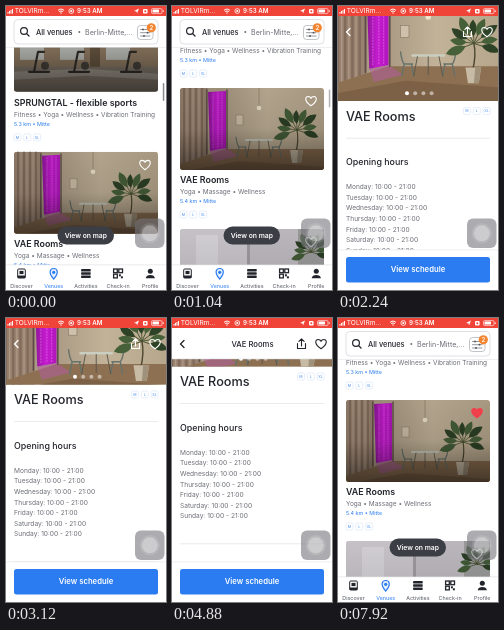
Write an HTML page that moves like this. It is 160 by 284 pixels and loops after 8000 ms.

```html
<!DOCTYPE html>
<html lang="en">
<head>
<meta charset="utf-8">
<title>Venue list and details</title>
<style>
  html, body { margin: 0; width: 100%; height: 100%; overflow: hidden; background: #fff; }
  svg { display: block; font-family: Inter, "Open Sans", sans-serif; }
  #stage { width: 100vw; height: 100vh; }
</style>
</head>
<body>
<svg id="stage" viewBox="0 0 160 284"></svg>
<script>
const LOOP = 8000;
const INK = '#22242b', GREY = '#6c6e76', BLUE = '#2b7cf0', RED = '#f0404c';
const VENUE = 'VAE Rooms';
const HEART = 'M0 4.8C-7 .2-6-4.5-2.9-4.5-1.3-4.5-.3-3.5 0-2.6.3-3.5 1.3-4.5 2.9-4.5 6-4.5 7 .2 0 4.8Z';

const rect = (x, y, w, h, fill, rx = 0, extra = '') =>
  `<rect x="${x}" y="${y}" width="${w}" height="${h}" rx="${rx}" fill="${fill}" ${extra}/>`;
const circle = (x, y, r, fill, extra = '') =>
  `<circle cx="${x}" cy="${y}" r="${r}" fill="${fill}" ${extra}/>`;
const line = (d, color = INK, width = 1, extra = '') =>
  `<path d="${d}" fill="none" stroke="${color}" stroke-width="${width}" stroke-linecap="round" stroke-linejoin="round" ${extra}/>`;
const shape = (d, fill, extra = '') => `<path d="${d}" fill="${fill}" ${extra}/>`;
const text = (x, y, size, str, fill = INK, weight = 400, anchor = 'start') =>
  `<text x="${x}" y="${y}" font-size="${size}" fill="${fill}" font-weight="${weight}" text-anchor="${anchor}">${str}</text>`;
const group = (x, y, body) => `<g transform="translate(${x} ${y})">${body}</g>`;
const heart = color =>
  `<path d="${HEART}" fill="none" stroke="${color}" stroke-width="1.1" stroke-linejoin="round"/>`;

const badges = (x, y) => ['M', 'L', 'XL'].map((s, i) =>
  rect(x + i * 9.8 - 3.5, y - 3.5, 7, 7, '#fff', 1.4, 'stroke="#dce8fa" stroke-width=".7"') +
  text(x + i * 9.8, y + 1.3, 3.6, s, '#6ba1ee', 500, 'middle')).join('');

// Pointed oval leaves fan out from the top of a stem.
function plant(x, y, size) {
  return [-172, -146, -118, -92, -66, -38, -10, 18, 160].map((angle, i) => {
    const length = size * (1 + i % 3 * .12);
    return `<g transform="translate(${x} ${y}) rotate(${angle})">` +
      line(`M0 0H${length * .4}`, '#46512f', .7) +
      shape(`M${length * .3} 0Q${length * .65} ${-length * .34} ${length} 0Q${length * .65} ${length * .26} ${length * .3} 0Z`,
        i % 2 ? '#2d4226' : '#46603a') + '</g>';
  }).join('');
}

function roomPhoto() {
  const chair = (x, flip) => `<g transform="translate(${x} 49) scale(${flip} 1)">` +
    line('M0 0Q1 8 3 10H10M3 10L1 20M9 10L11 20', '#66726a', 1.2) + '</g>';
  return rect(0, 0, 144, 95, 'url(#wall)') +
    rect(0, 0, 28, 95, '#98826f') +
    line('M4 0V82M10 0V80M16 0V78M22 0V75', '#826b5b', 2) + line('M7 0V82M13 0V80M19 0V78', '#ae9987', 1) +
    shape('M0 76L46 61H144V95H0Z', '#8d7052') + shape('M0 84L60 73L144 79V95H0Z', '#7d6147') +
    shape('M30 63L46 60L58 68L34 74Z', '#b65ca6', 'opacity=".5"') +
    shape('M28 4L46 3V60L30 63Z', 'url(#neon)') +
    line('M33 6V60M38 5V60M42 5V60', '#dc52e4', .8, 'stroke-dasharray="1 1.4"') +
    line('M26.8 2V66M47 2V61', '#5f4c49', 1.4) +
    rect(56, 27, 7, 10, '#cec0aa', 0, 'stroke="#8f806c" stroke-width=".6"') +
    line('M79 0V18', '#776c5b', .5) + circle(79, 20, 2.3, '#eee3cb') +
    chair(56, 1) + chair(102, -1) +
    rect(65, 51, 28, 2, '#c9cec0', 1) + line('M70 53L67 69M88 53L91 69M79 53V68', '#5c574b', .8) +
    line('M116 64Q119 52 117 42', '#4c4630', 1.2) + plant(117, 42, 20) +
    shape('M110 62H123L121 75H112Z', '#c8bba5') + shape('M118 62H123L121 75H117Z', '#a0917b');
}

function gymPhoto() {
  const machine = x => line(`M${x} 62L${x + 4} 42H${x + 10}M${x - 5} 62H${x + 15}`, '#312d2a', 2.2) +
    circle(x + 11, 56, 4, '#443f3a');
  return rect(0, 0, 144, 82, '#8d7961') + rect(0, 0, 144, 30, '#a39179') +
    [6, 46, 92].map(x => rect(x, 30, 24, 20, '#b9bbb5')).join('') +
    rect(76, 28, 10, 32, '#65543f') + shape('M0 57H144V82H0Z', '#80766a') +
    shape('M0 62L72 59L144 64V70L72 66L0 70Z', '#9b9388') + [20, 60, 112].map(machine).join('');
}

function studioPhoto() {
  return rect(0, 0, 144, 82, '#cac6cd') + rect(0, 0, 68, 82, '#d6d2d8') +
    rect(16, 6, 22, 42, '#e3e0e5') + rect(67, 0, 3, 82, '#aaa4aa') +
    rect(118, 0, 26, 82, '#a6a5a6') + rect(0, 60, 144, 22, '#9f9289') + plant(131, 23, 17);
}

const photo = (y, body, mark) => group(8, y,
  `<g clip-path="url(#card)">${body}${rect(0, 0, 144, 82, 'url(#shade)')}</g>` + group(131, 13, mark));

const venueText = (y, title, kinds, distance) =>
  text(8, y + 3.2, 8.9, title, INK, 600) + text(8, y + 14.2, 6.5, kinds, GREY) +
  text(8, y + 23.2, 5.4, distance, BLUE) + badges(11.5, y + 34.5);

function searchBar() {
  return rect(0, 0, 160, 41, '#fff') + rect(0, 41, 160, .6, '#e3e4e8') +
    rect(8, 13.5, 144, 24.5, '#fff', 4, 'stroke="#d7d9de" stroke-width=".8"') +
    circle(18, 25, 3.4, 'none', `stroke="${INK}" stroke-width="1.2"`) + line('M20.6 27.6L23 30', INK, 1.3) +
    text(30, 28.7, 7.4, 'All venues', INK, 500) + circle(73.3, 26, 1, GREY) +
    text(79, 28.7, 7.1, 'Berlin-Mitte,...', GREY) +
    rect(131.5, 19.5, 15.5, 14, '#fff', 3, 'stroke="#9a9ca3" stroke-width=".6"') +
    line('M134.5 23.5H144M134.5 26.7H144M134.5 30H144', '#50535b', .6) +
    circle(137, 23.5, .9, '#50535b') + circle(141.5, 26.7, .9, '#50535b') + circle(138, 30, .9, '#50535b') +
    circle(145.3, 21.8, 4.6, '#f38430') + text(145.3, 24, 6, '2', '#fff', 600, 'middle');
}

function tabBar() {
  const icons = [
    rect(-3.8, -4.5, 7.6, 9, '#fff', 1, `stroke="${INK}"`) + rect(-2, -2.6, 4, 3.2, INK) + rect(-3.8, 2, 7.6, 2.5, INK),
    shape('M0 5.5C-5.5-.5-4-5 0-5S5.5-.5 0 5.5Z', '#e6f0fe', `stroke="${BLUE}" stroke-width="1.2"`) + circle(0, -1.2, 1.6, BLUE),
    [-4.5, -1.2, 2.1].map(y => rect(-4.8, y, 9.6, 2.4, INK, .4)).join(''),
    [[-4.5, -4.5], [.7, -4.5], [-4.5, .7]].map(([x, y]) =>
      rect(x, y, 3.7, 3.7, 'none', 0, `stroke="${INK}" stroke-width="1.3"`)).join('') +
      rect(.8, .8, 2, 2, INK) + rect(2.8, 2.8, 2, 2, INK),
    circle(0, -2.2, 2.5, INK) + shape('M-4.6 4.8C-4.6 .3 4.6 .3 4.6 4.8Z', INK)
  ];
  const names = ['Discover', 'Venues', 'Activities', 'Check-in', 'Profile'];
  return rect(0, 259, 160, 25, '#fff') + rect(0, 258.6, 160, .6, '#dcdde1') +
    names.map((name, i) => {
      const x = 15.5 + i * 32.2;
      return group(x, 267.5, icons[i]) + text(x, 281.5, 5.4, name, i === 1 ? BLUE : '#555861', 400, 'middle');
    }).join('');
}

function listScreen() {
  return rect(0, 0, 160, 284, '#fff') + '<g id="feed">' +
    photo(-60, gymPhoto(), heart('#fff')) +
    venueText(33, 'SPRUNGTAL - flexible sports', 'Fitness • Yoga • Wellness • Vibration Training', '5.3 km • Mitte') +
    photo(82, roomPhoto(), `<g id="listHeart">${heart('#fff')}</g>`) +
    venueText(174, VENUE, 'Yoga • Massage • Wellness', '5.4 km • Mitte') +
    photo(223, studioPhoto(), heart('#fff')) + '</g>' +
    `<g id="scrollbar">${rect(156.8, 77, 1.5, 18, '#8a8b90', .75)}</g>` +
    searchBar() + rect(51.5, 220.5, 56.5, 18, '#3b3e45', 9) +
    text(79.8, 231.9, 6.8, 'View on map', '#fff', 600, 'middle') + tabBar();
}

const navIcons = (color, id) =>
  line('M12 22.5L8.5 26L12 29.5', color, 1.3) +
  line('M125.5 25.5V30.5H133.5V25.5M129.5 28V20.8M126.9 23.3L129.5 20.8L132.1 23.3', color, 1.1) +
  group(149, 26, `<g id="${id}">${heart(color)}</g>`);

function detailScreen() {
  const days = ['Monday', 'Tuesday', 'Wednesday', 'Thursday', 'Friday', 'Saturday', 'Sunday'];
  const bars = [[145, 50, 9], [160, 100, 7.5], [169.7, 100, 7.5], [179.5, 100, 7.5], [203, 50, 9], [219.5, 144, 65]];
  return rect(-2, 10, 2, 274, '#000', 0, 'opacity=".07"') + rect(0, 10, 160, 274, '#fff') +
    '<g id="page"><svg x="0" y="10" width="160" height="85" viewBox="4 19 133 71" preserveAspectRatio="xMidYMid slice">' +
    `<g id="hero">${roomPhoto()}</g></svg>` +
    [69, 77.2, 85.4, 93.6].map((x, i) => circle(x, 87.3, 2, '#fff', `opacity="${i ? .5 : 1}"`)).join('') +
    text(8, 114.8, 12.7, VENUE, INK, 500) + badges(129, 105) + rect(8, 131.8, 144, .7, '#e1e2e6') +
    '<g id="skeleton">' + bars.map(([y, w, h]) => rect(8, y, w, h, '#ebebef')).join('') + '</g>' +
    '<g id="hours">' + text(8, 159.2, 8.9, 'Opening hours', INK, 500) +
    days.map((day, i) => text(8, 183.2 + i * 10.6, 6.6, `${day}: 10:00 - 21:00`, GREY)).join('') +
    rect(8, 272, 144, .7, '#e1e2e6') + '</g></g>' +
    `<g id="lightNav">${navIcons('#fff', 'lightHeart')}</g>` +
    '<g id="nav">' + rect(0, 10, 160, 31, '#fff') + rect(0, 40.6, 160, .6, '#dfe0e4') +
    text(80.5, 28.8, 7.7, VENUE, INK, 500, 'middle') + navIcons(INK, 'navHeart') + '</g>' +
    '<g id="footer">' + rect(0, 244, 160, 40, '#fff') + rect(0, 243.6, 160, .6, '#e3e4e8') +
    rect(8, 251, 144, 25.5, BLUE, 2.5) + text(80, 266.2, 7.7, 'View schedule', '#fff', 600, 'middle') + '</g>';
}

function statusBar() {
  return rect(0, 0, 160, 10, '#f04438') +
    [0, 1, 2, 3].map(i => rect(1.5 + i * 1.5, 6 - i, 1, 1.6 + i, '#fff')).join('') +
    text(8.8, 7.3, 6.6, 'TOLVIRm...', '#fff') +
    line('M52.3 4Q55 1.7 57.7 4M53.5 5.4Q55 4.2 56.5 5.4', '#fff', 1) + circle(55, 7, .7, '#fff') +
    circle(65.3, 5, 2.4, 'none', 'stroke="#fff" stroke-width=".8"') + circle(65.3, 5, 1.1, '#fff') +
    text(83.8, 7.3, 6.2, '9:53 AM', '#fff', 600, 'middle') +
    shape('M128 5L133 2.5L131 7.5L130.6 5.4Z', '#fff') +
    rect(137, 3, 4.6, 4.6, '#fff', 1) + circle(139.3, 5.3, 1, '#f04438') +
    rect(145.5, 2.6, 10.5, 5, 'none', 1.2, 'stroke="#fff" stroke-width=".6"') +
    rect(146.5, 3.6, 6.5, 3, '#fff', .5) + rect(156.8, 4.2, .8, 1.8, '#fff');
}

const stage = document.getElementById('stage');
stage.innerHTML = `<defs>
  <linearGradient id="wall"><stop offset=".3" stop-color="#a99983"/><stop offset=".6" stop-color="#c2b298"/><stop offset="1" stop-color="#b5a58b"/></linearGradient>
  <linearGradient id="neon"><stop stop-color="#8d1598"/><stop offset=".5" stop-color="#c61bd0"/><stop offset="1" stop-color="#b016bb"/></linearGradient>
  <linearGradient id="shade" x2="0" y2="1"><stop stop-opacity=".08"/><stop offset=".5" stop-opacity=".14"/><stop offset="1" stop-opacity=".5"/></linearGradient>
  <clipPath id="card"><rect width="144" height="82" rx="3"/></clipPath></defs>
  <g id="list">${listScreen()}</g><g id="detail">${detailScreen()}</g>${statusBar()}` +
  rect(129, 212.5, 29.5, 29.5, '#74757c', 6, 'opacity=".6"') +
  circle(143.8, 227.3, 10.2, '#fff', 'opacity=".12"') + circle(143.8, 227.3, 8, '#fff', 'opacity=".3"');

const $ = id => document.getElementById(id);
const clamp = v => Math.max(0, Math.min(1, v));
const span = (t, start, length) => clamp((t - start) / length);
const move = (id, x, y) => $(id).setAttribute('transform', `translate(${x} ${y})`);
const fade = (id, v) => $(id).setAttribute('opacity', v);
const easeOut = (p, power) => 1 - (1 - p) ** power;

function paintHeart(id, liked, color, scale = 1) {
  const path = $(id).firstElementChild;
  path.setAttribute('fill', liked ? RED : 'none');
  path.setAttribute('stroke', liked ? RED : color);
  path.setAttribute('transform', `scale(${scale})`);
}

function render(t) {
  const glide = 64 * easeOut(span(t, 0, 960), 2);
  move('feed', 0, 64 - glide);
  move('scrollbar', 0, glide * .1);
  fade('scrollbar', 1 - span(t, 960, 250));

  const open = t < 7200 ? easeOut(span(t, 1116, 500), 3) : 1 - easeOut(span(t, 7200, 500), 3);
  move('list', -48 * open, 0);
  move('detail', 160 * (1 - open), 0);
  $('detail').setAttribute('visibility', open > 0 ? 'visible' : 'hidden');

  const loaded = span(t, 1900, 160);
  fade('skeleton', 1 - loaded);
  fade('hours', loaded);
  fade('footer', loaded);

  // The cover picture moves at half the speed of the page.
  const scroll = 46.5 * easeOut(span(t, 2800, 850), 2);
  move('page', 0, -scroll);
  move('hero', 0, scroll / 2.4);
  const solid = clamp((scroll - 30) / 13);
  fade('nav', solid);
  fade('lightNav', 1 - solid);

  const liked = t >= 5680;
  const pop = 1 + .25 * Math.sin(Math.PI * span(t, 5680, 280));
  paintHeart('navHeart', liked, INK, pop);
  paintHeart('listHeart', liked, '#fff');
}

const begin = performance.now();
function tick(now) {
  render(Math.max(0, now - begin) % LOOP);
  requestAnimationFrame(tick);
}
render(0);
requestAnimationFrame(tick);
</script>
</body>
</html>
```
